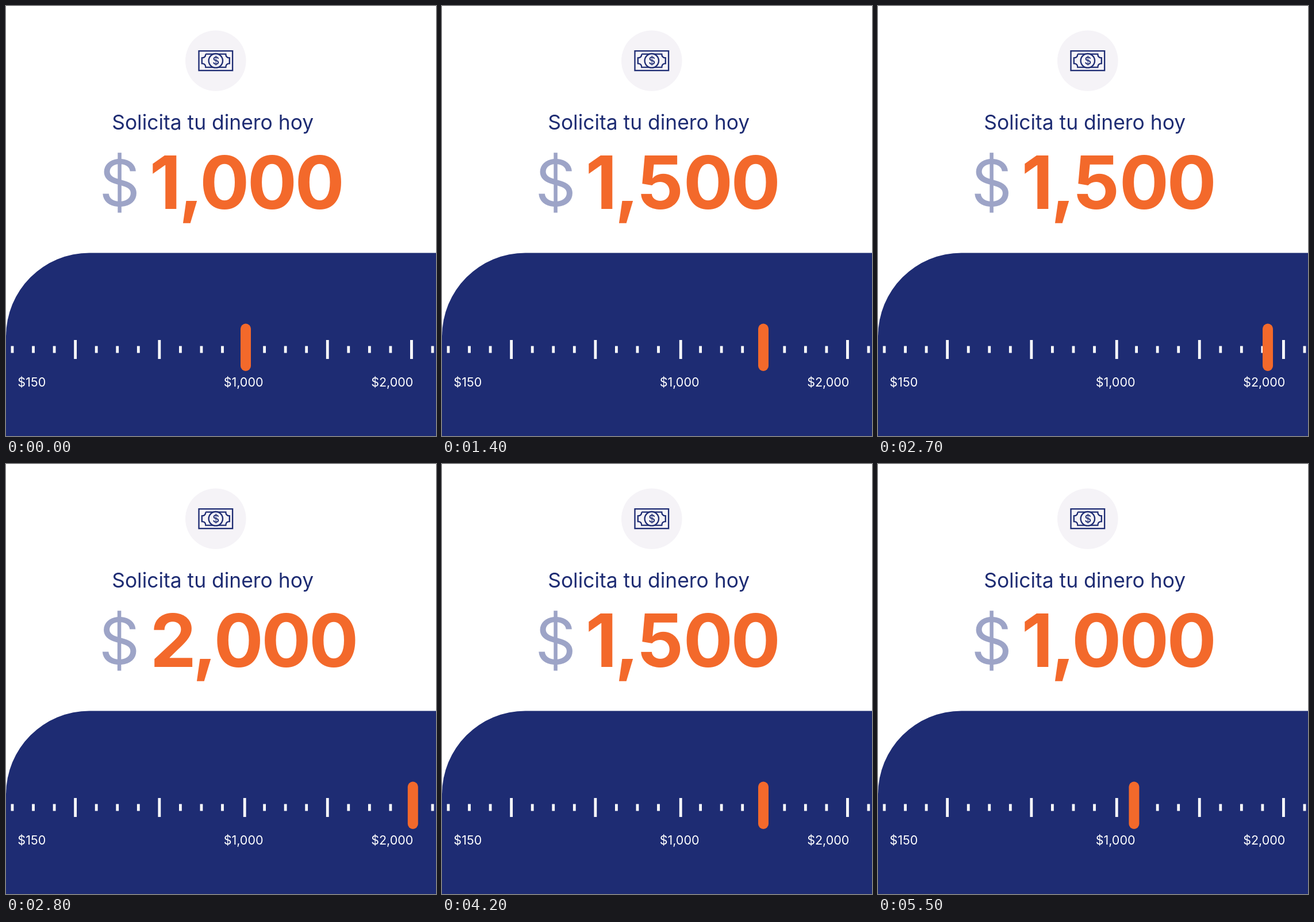
An HTML page with a canvas that plays this animation: 748 px wide and 748 px high, repeating every 5.6 s.

```html
<!DOCTYPE html>
<html lang="es">
<head>
<meta charset="utf-8">
<title>Solicita tu dinero hoy</title>
<style>
  html, body { margin: 0; width: 100%; height: 100%; overflow: hidden; background: #fff; }
  canvas { display: block; width: 748px; height: 748px; }
</style>
</head>
<body>
<canvas id="stage" width="748" height="748"></canvas>
<script>
const ctx = document.getElementById('stage').getContext('2d');
const NAVY = '#1e2c73', ORANGE = '#f3692b', PALE = '#f5f3f7', LAVENDER = '#9da4c7';
const LOOP = 5600, STEP = 100;

// Draws text with its ink centred on cx.
function text(str, cx, baseline, size, weight, color) {
  ctx.font = `${weight} ${size}px Inter, "Open Sans", sans-serif`;
  ctx.fillStyle = color;
  const m = ctx.measureText(str);
  ctx.fillText(str, cx - (m.actualBoundingBoxRight - m.actualBoundingBoxLeft) / 2, baseline);
}

function disc(x, y, r, color) {
  ctx.fillStyle = color;
  ctx.beginPath();
  ctx.arc(x, y, r, 0, Math.PI * 2);
  ctx.fill();
}

function drawIcon() {
  const cx = 364.8, cy = 95.2;
  disc(cx, cy, 52.8, PALE);
  ctx.strokeStyle = NAVY;
  ctx.lineWidth = 2.3;
  ctx.strokeRect(cx - 29.3, cy - 17, 58.6, 34);

  // inner border with concave corners
  const w = 24, h = 11.5, c = 6.5;
  ctx.beginPath();
  ctx.moveTo(cx - w + c, cy - h);
  ctx.lineTo(cx + w - c, cy - h);
  ctx.quadraticCurveTo(cx + w - c, cy - h + c, cx + w, cy - h + c);
  ctx.lineTo(cx + w, cy + h - c);
  ctx.quadraticCurveTo(cx + w - c, cy + h - c, cx + w - c, cy + h);
  ctx.lineTo(cx - w + c, cy + h);
  ctx.quadraticCurveTo(cx - w + c, cy + h - c, cx - w, cy + h - c);
  ctx.lineTo(cx - w, cy - h + c);
  ctx.quadraticCurveTo(cx - w + c, cy - h + c, cx - w + c, cy - h);
  ctx.stroke();

  disc(cx, cy, 12.2, PALE);
  ctx.beginPath();
  ctx.arc(cx, cy, 12.2, 0, Math.PI * 2);
  ctx.stroke();
  text('$', cx, cy + 6.8, 18.5, 500, NAVY);
}

function drawAmount(value) {
  const wide = value[0] === '2';
  const first = wide ? 290.5 : 275.5;
  const comma = wide ? 344 : 320;
  const hundreds = wide ? 404.5 : 380;
  text('$', wide ? 196.9 : 197.6, 347.5, 111, 400, LAVENDER);
  const centres = [first, comma, hundreds, hundreds + 82.8, hundreds + 165.6];
  [...value].forEach((ch, i) => text(ch, centres[i], 353, 128, 700, ORANGE));
}

function drawPanel() {
  ctx.fillStyle = NAVY;
  ctx.beginPath();
  ctx.roundRect(0, 429.5, 748, 318.5, [145, 0, 0, 0]);
  ctx.fill();

  ctx.fillStyle = '#fff';
  for (let i = 0; i <= 20; i++) {
    const x = i === 11 ? 415.2 : 11 + 36.55 * i;
    const tall = i % 4 === 3;
    ctx.fillRect(x - 2.4, tall ? 581 : 591.5, 4.8, tall ? 33 : 12);
  }
  text('$150', 45, 662, 21.5, 400, '#fff');
  text('$1,000', 413.3, 662, 21.5, 400, '#fff');
  text('$2,000', 672, 662, 21.5, 400, '#fff');
}

function drawMarker(x) {
  ctx.fillStyle = ORANGE;
  ctx.beginPath();
  ctx.roundRect(x - 9, 552.5, 18, 82.5, 9);
  ctx.fill();
}

function amountAt(n) {
  if (n < 14 || n >= 52) return '1,000';
  return n >= 28 && n < 38 ? '2,000' : '1,500';
}

function render(ms) {
  const n = Math.floor((ms % LOOP) / STEP);
  const ramp = start => Math.min(1, Math.max(0, (n - start) / 5));
  const x = 417 + 142 * (ramp(9) - ramp(51)) + 148.8 * (ramp(23) - ramp(37));

  ctx.fillStyle = '#fff';
  ctx.fillRect(0, 0, 748, 748);
  drawIcon();
  text('Solicita tu dinero hoy', 360.2, 215, 35.4, 400, NAVY);
  drawAmount(amountAt(n));
  drawPanel();
  drawMarker(x);
}

const began = performance.now();
function tick() {
  render(performance.now() - began);
  requestAnimationFrame(tick);
}
tick();
</script>
</body>
</html>
```
